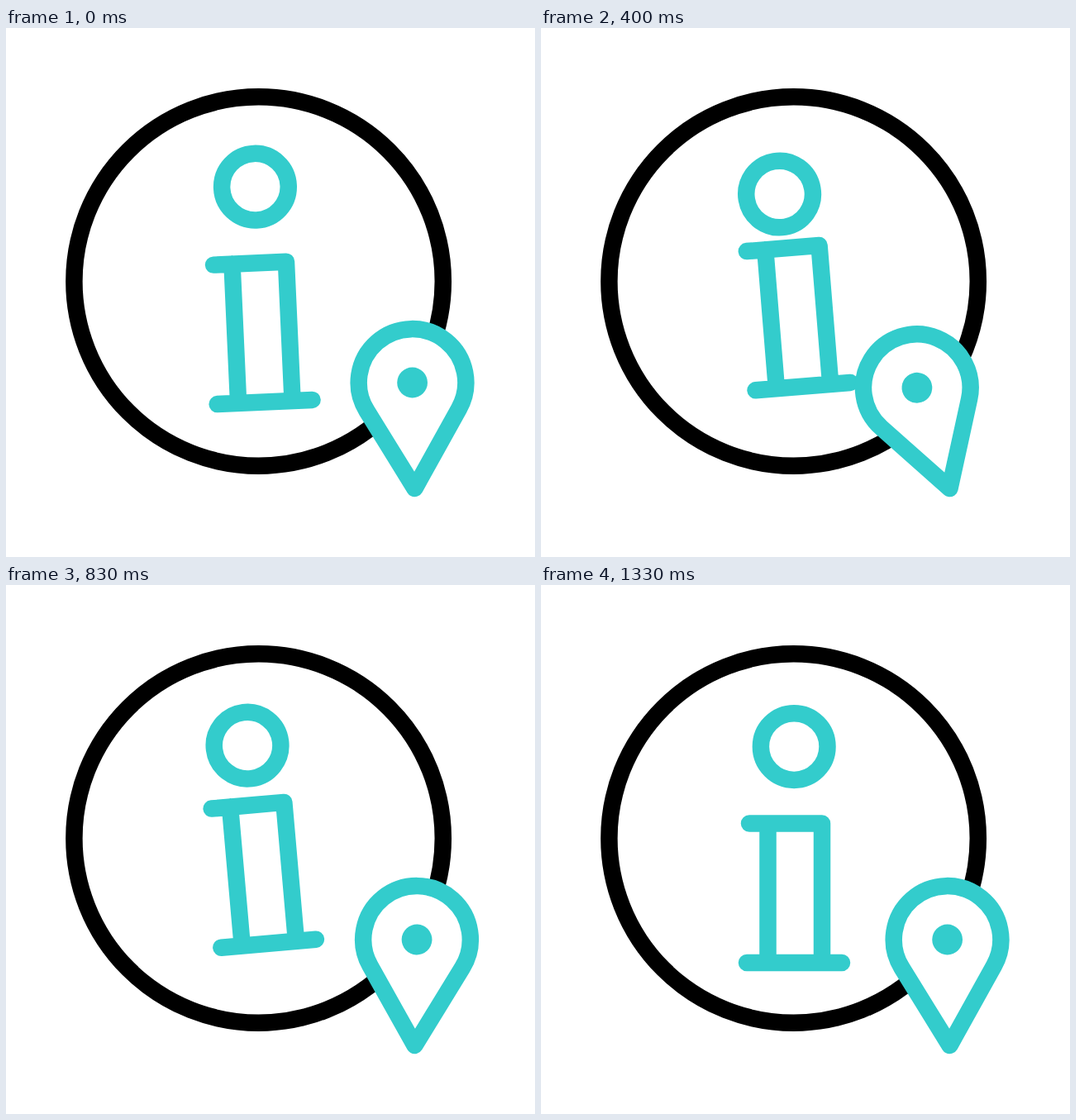
Recreate the animation shown at these times as an HTML page. Size 640x640 px, loop 1670 ms.

```html
<!DOCTYPE html>
<html lang="en">
<head>
<meta charset="utf-8">
<title>Information point</title>
<style>
  html, body { margin: 0; width: 100%; height: 100%; overflow: hidden; background: #fff; }
  svg { display: block; width: 100%; height: 100%; }
</style>
</head>
<body>
<svg viewBox="0 0 640 640" fill="none" stroke="#3cc" stroke-width="20.5" stroke-linecap="round" stroke-linejoin="round">
  <circle cx="305.6" cy="306.5" r="223.2" stroke="#000"/>
  <path id="stem" d="M252 288.5H340V457M274.5 288.5V457M249 457H364"/>
  <circle id="dot" cx="306.2" cy="195.6" r="40.3"/>
  <g id="pin">
    <path d="M494.5 557L436.4 463A64.8 64.8 0 1 1 548.1 460.5Z" fill="#fff"/>
    <circle cx="491.6" cy="429" r="18.4" fill="#3cc" stroke="none"/>
  </g>
</svg>
<script>
const LOOP = 1670, STEP = 100 / 3, LAST = 40;
const [stem, dot, pin] = ['stem', 'dot', 'pin'].map(id => document.getElementById(id));

// Swings from rest through each peak and back to rest, one eased move per beat.
function swing(k, start, beat, ...peaks) {
  const beats = Math.max(0, (k - start) / beat);
  const n = Math.floor(beats), u = beats - n;
  const from = peaks[n - 1] ?? 0, to = peaks[n] ?? 0;
  return from + (to - from) * u * u * (3 - 2 * u);
}

function place(part, angle, lift) {
  part.setAttribute('transform', `rotate(${angle} 306 306.5) translate(0 ${-lift})`);
}

function draw(now) {
  const k = Math.min(LAST, Math.floor((now % LOOP + 3.5) / STEP));
  place(stem, swing(k, -1.5, 8.5, -31.4, 11, -5.2), swing(k, -1.5, 8.5, 52.7, 5.5, 23.7));
  place(dot, swing(k, -1.4, 8.7, -34.4, 10.1, -7.2), swing(k, -1.3, 6.7, 36, -4, -1.6, 2.4));
  pin.setAttribute('transform', `rotate(${swing(k, 6.5, 7.4, -20, 9.7, -4.8, 3.2, -2.7)} 494.5 557)`);
}

const start = performance.now();
function tick() {
  draw(performance.now() - start);
  requestAnimationFrame(tick);
}
tick();
</script>
</body>
</html>
```
